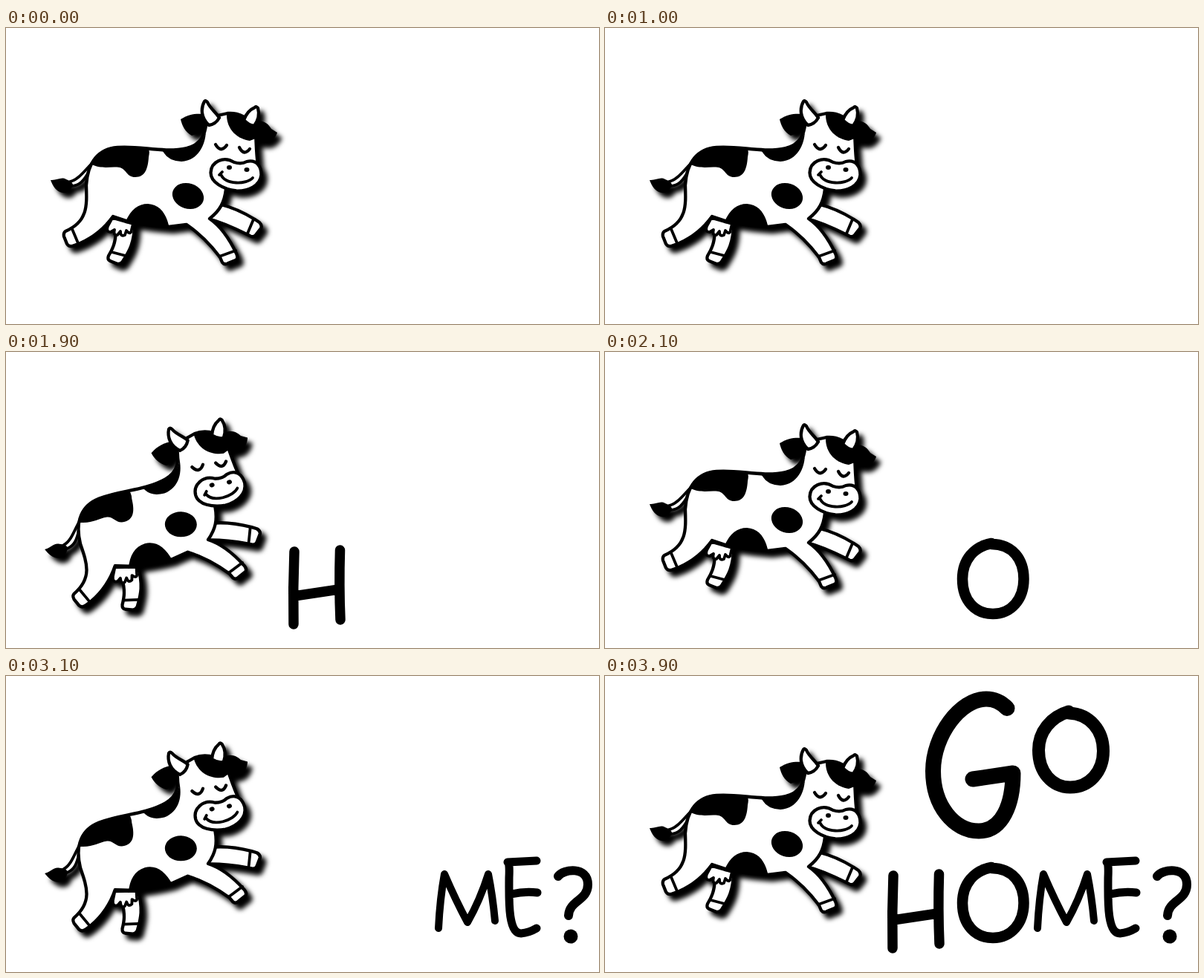
Animation of 798x399 px, one loop 6.1 s. Source, as an HTML page:

```html
<!DOCTYPE html>
<html lang="en">
<head>
<meta charset="utf-8">
<title>Go home?</title>
<style>
  html, body { margin: 0; width: 100%; height: 100%; overflow: hidden; background: #fff; }
  svg { display: block; width: 100%; height: 100%; }
  .outline { fill: #fff; stroke: #000; stroke-width: 4.3; stroke-linejoin: round; stroke-linecap: round; }
  .line { fill: none; }
  .thin { stroke-width: 3.8; }
  .letters path { fill: none; stroke: #000; stroke-linecap: round; stroke-linejoin: round; }
</style>
</head>
<body>
<svg viewBox="0 0 798 399">
  <defs>
    <filter id="shadow" filterUnits="userSpaceOnUse" x="0" y="0" width="420" height="399">
      <feDropShadow dx="6.500" dy="7" stdDeviation="3.200" flood-color="#000" flood-opacity="1"/>
    </filter>
  </defs>

  <g filter="url(#shadow)">
    <g id="cow">
      <!-- tail -->
      <path class="outline thin" d="M86 207C97 205 105 193 118 180L109 198C103 208 97 213 87 213Z"/>
      <path d="M60 205C68 206 74 200 81 204Q90 207 90 212C87 219 82 223 76 222C68 221 63 213 60 205Z"/>
      <!-- far legs -->
      <path class="outline" d="M148 275C147 290 144 297 138 307Q136 312 140 314L150 318Q156 318 158 313C165 302 173 290 173 264Z"/>
      <path class="outline line thin" d="M142 302L161 307"/>
      <path class="outline" d="M289 238C306 242 322 250 335 258L341 262Q345 266 343 270L336 279Q333 283 328 280C312 272 295 263 272 257Z"/>
      <path class="outline line thin" d="M333 258L325 277"/>
      <!-- ears -->
      <path d="M235 123C246 116 256 115 265 116L273 130C265 138 258 143 250 145C241 140 237 132 235 123Z"/>
      <path d="M335 126C346 123 353 129 357 136L365 141C361 152 351 159 336 153Z"/>
      <!-- body, near legs and head -->
      <path class="outline" d="M270 126C268 142 264 157 243 162C225 166 205 164 190 162.500C175 161 162 160 150 161C125 163 110 180 108 212C109 240 110 261 80 274Q77 276 78 281L82 291Q85 296 92 293L100 290C118 282 134 268 144 254L168 262Q195 267 219 268L243 265C262 278 276 293 288 309L291 316Q294 320 299 317L309 313Q313 311 310 304C301 285 290 268 274 257C288 246 294 235 296 217L339 185C336 165 337 145 335 132Q318 113 298 115L285 118Z"/>
      <path class="outline line thin" d="M89 271L97 290M287 308L309 300"/>
      <!-- udder -->
      <path class="outline thin" d="M143 256L137 267Q134 275 141 275L146 272Q144 280 150 279L154 274Q154 282 160 279L162 273Q168 280 169 272L171 264Z"/>
      <!-- spots -->
      <path d="M115 184C121 168 133 161 150 160L191 162Q194 165 192 174C191 190 187 201 174 201C162 201 162 190 153 188C140 186 132 191 115 184Z"/>
      <path d="M206 163Q230 166 244 162C262 157 267 148 269 140C268 158 259 178 236 180Q219 179 213 169Q211 165 206 163Z"/>
      <path d="M160 263C167 246 177 237 191 237C207 238 216 250 220 270Q190 266 160 263Z"/>
      <ellipse cx="245" cy="226.500" rx="21.500" ry="17" transform="rotate(18 245 226.500)"/>
      <path d="M297 115Q320 112 336 133V149L328 152C313 150 296 138 297 115Z"/>
      <!-- horns -->
      <path class="outline" d="M267 99C262 108 262 121 273 131Q282 130 287 121C282 113 275 109 271 100Q269 97 267 99Z"/>
      <path class="outline" d="M335 107C328 110 323 116 320 124Q326 131 334 132C340 124 341 115 339 108Q337 105 335 107Z"/>
      <!-- face -->
      <path class="outline line" d="M282 157Q289 169 297 158M314 161Q320 173 328 163"/>
      <path class="outline" d="M275.500 195C276 180 293 172 307 181Q317 184 324 180C338 177 343.500 187 343.500 198C342 213 326 220 310 219.500C292 217 275.500 208 275.500 195Z"/>
      <ellipse cx="300.500" cy="188" rx="3.500" ry="3"/>
      <ellipse cx="324" cy="191" rx="3.500" ry="3"/>
      <path class="outline line thin" d="M287 198L291 194M289 197C295 212 324 211 332 202"/>
    </g>
  </g>

  <g class="letters">
    <g id="G"><path stroke-width="21" d="M541 43.500Q529 31 513 31C478 31 441.500 80 441.500 128C441.500 175 470 209 503 209C535 209 549 172 549 131L495 139"/></g>
    <g id="O1"><path stroke-width="17" d="M624 48C600 55 583.500 75 583.500 100C583.500 130 602 150 626 150C652 150 670.500 129 670.500 101C670.500 74 653 51 624 50"/></g>
    <g id="H"><path stroke-width="13.500" d="M388 269Q386 318 387 367M449.500 267Q448 315 450 361M388 329L448 320"/></g>
    <g id="O2"><path stroke-width="14.500" d="M520 258C497 262 481 280 481 306C481 335 498 353 522 353C547 353 563.500 333 563.500 306C563.500 280 549 259 520 259"/></g>
    <g id="M"><path stroke-width="10" d="M582 340Q584 300 590 267Q605 302 621 332Q638 302 649 267Q655 297 658 330"/></g>
    <g id="E"><path stroke-width="11" d="M714 249L675 251Q678 251 677 272C677 300 675 347 693 347Q704 346 714 340M680 294Q698 290 715 292"/></g>
    <g id="Q"><path stroke-width="12" d="M743 270C750 260 783 256 783 281C783 303 758 302 757 323"/><circle cx="760" cy="351" r="9.500"/></g>
  </g>
</svg>
<script>
  const LOOP = 6100;
  const TILT = 'translate(-65.2 87.4) rotate(-17)';
  const poseChanges = [500, 1000, 1500, 2100, 3100, 3700];

  // Each letter flashes once from left to right, then returns from right to left.
  const flashStart = 1500, returnStart = 2700, step = 200;
  const letters = ['G', 'O1', 'H', 'O2', 'M', 'E', 'Q'].map(id => document.getElementById(id));
  const cow = document.getElementById('cow');

  function draw(t) {
    const tilted = poseChanges.filter(time => t >= time).length % 2 === 1;
    cow.setAttribute('transform', tilted ? TILT : '');
    letters.forEach((letter, i) => {
      const flash = flashStart + i * step;
      const back = returnStart + (letters.length - 1 - i) * step;
      const visible = (t >= flash && t < flash + step) || t >= back;
      letter.style.display = visible ? '' : 'none';
    });
  }

  let start;
  function tick(now) {
    start ??= now;
    draw((now - start) % LOOP);
    requestAnimationFrame(tick);
  }
  draw(0);
  requestAnimationFrame(tick);
</script>
</body>
</html>
```
